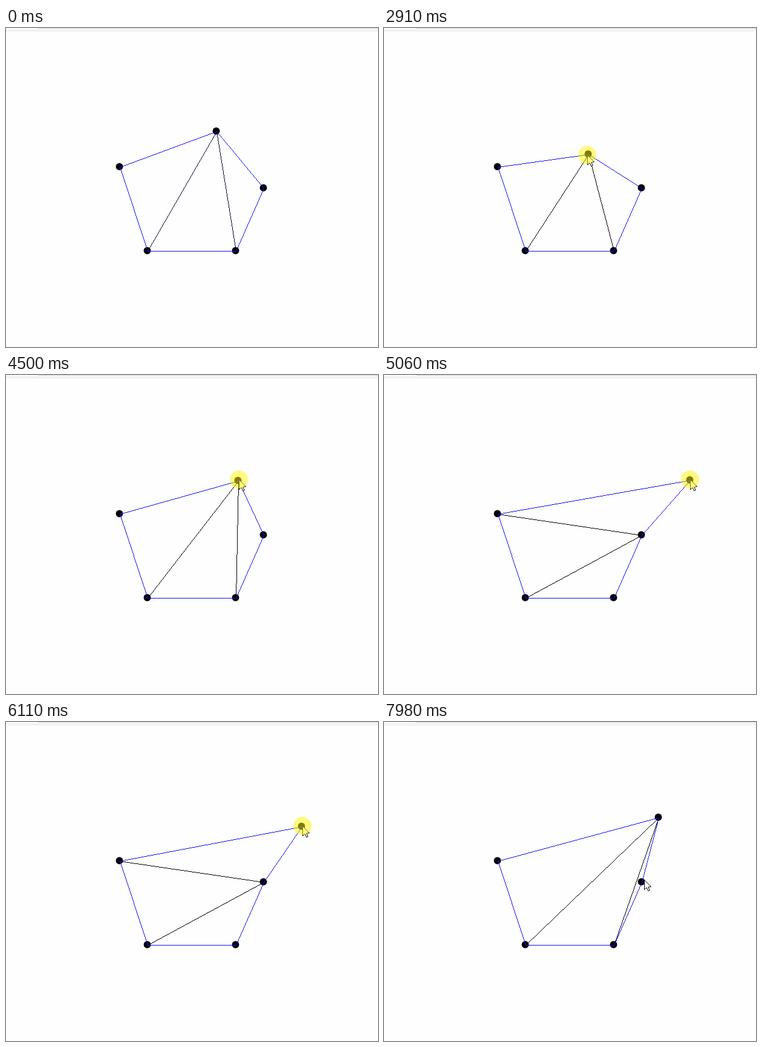
Recreate the animation shown at these times as an HTML page with a canvas. Size 615x528 px, loop 8000 ms.

```html
<!DOCTYPE html>
<html lang="en">
<head>
<meta charset="utf-8">
<title>Polygon triangulation</title>
<style>
  html, body { margin: 0; width: 100%; height: 100%; overflow: hidden; background: #fefefe; }
  canvas { display: block; }
</style>
</head>
<body>
<canvas id="stage" width="615" height="528"></canvas>
<script>
const ctx = document.getElementById('stage').getContext('2d');
const LOOP = 8000, STEP = 70, LAG = 10;
const ENTER = 330, PRESS = 2300, DRAG = 2630, RELEASE = 6870;

const A = [188, 230], C = [426, 265], D = [380, 369], E = [234, 369];
const REST = [348, 171];

// Each stroke of the pointer starts where the last one ended: start time, then [time, x, y]
const HOME = [532, 508];
const strokes = [
  [260, [960, 345, 188], [1240, 352, 168]],
  [1640, [1830, 346, 174]],
  [2560, [3120, 332, 226]],
  [3310, [3730, 226, 248], [4500, 385, 173], [5160, 508, 173],
    [5550, 339, 163], [6230, 513, 172], [6670, 453, 157]],
  [7080, [7980, 430, 262]]
];
let last = HOME;
for (const s of strokes) {
  s[0] = [s[0], ...last];
  last = s[s.length - 1].slice(1);
}

function strokeAt(t) {
  return strokes.filter(s => s[0][0] <= t).pop() || strokes[0];
}

// The picture is refreshed in fixed steps counted from the start of a stroke
function sampled(t) {
  const start = strokeAt(t)[0][0];
  return start + Math.floor((t - start) / STEP) * STEP;
}

// Smooth curve through the points, at rest at both ends of a stroke
function pointer(t) {
  const s = strokeAt(t), end = s.length - 1;
  t = Math.min(Math.max(t, s[0][0]), s[end][0]);
  let i = 0;
  while (i < end - 1 && s[i + 1][0] <= t) i++;
  const a = s[i], b = s[i + 1], h = b[0] - a[0];
  const u = (t - a[0]) / h, v = 1 - u;
  const slope = (j, k) => j === 0 || j === end ? 0 :
    (s[j + 1][k] - s[j - 1][k]) / (s[j + 1][0] - s[j - 1][0]);
  return [1, 2].map(k =>
    (1 + 2 * u) * v * v * a[k] + u * v * v * h * slope(i, k) +
    u * u * (3 - 2 * u) * b[k] - u * u * v * h * slope(i + 1, k));
}

function turn(p, q, r) {
  return (q[0] - p[0]) * (r[1] - q[1]) - (q[1] - p[1]) * (r[0] - q[0]);
}

function diagonals(B) {
  if (turn(B, C, D) < 0) return [[C, A], [C, E]];
  if (turn(A, B, C) < 0) return [[D, A], [D, B]];
  return [[B, E], [B, D]];
}

// Hard-edged one-pixel line
function line(p, q, color) {
  ctx.fillStyle = color;
  const dx = q[0] - p[0], dy = q[1] - p[1];
  const n = Math.max(Math.abs(dx), Math.abs(dy), 1);
  for (let i = 0; i <= n; i++) {
    ctx.fillRect(Math.round(p[0] + dx * i / n), Math.round(p[1] + dy * i / n), 1, 1);
  }
}

function disc(x, y, r, color) {
  ctx.fillStyle = color;
  ctx.beginPath();
  ctx.arc(x, y, r, 0, Math.PI * 2);
  ctx.fill();
}

const arrow = new Path2D('M.5 .5V16.5L4.2 13.2L6.7 18.7L9.2 17.6L6.8 12.2L11.6 11.7Z');

function drawPointer(x, y) {
  ctx.save();
  ctx.translate(x, y);
  ctx.fillStyle = '#fff';
  ctx.fill(arrow);
  ctx.strokeStyle = '#000';
  ctx.stroke(arrow);
  ctx.restore();
}

function draw(t) {
  const now = sampled(t);
  const [x, y] = pointer(now).map(Math.round);
  const B = t < DRAG ? REST :
    pointer(Math.min(now, RELEASE) - LAG).map(v => Math.round(v + 1));

  ctx.fillStyle = '#fefefe';
  ctx.fillRect(0, 0, 615, 528);
  ctx.fillStyle = '#f2f2f2';
  ctx.fillRect(0, 2, 615, 4);
  ctx.fillStyle = '#d2d2d2';
  ctx.fillRect(53, 0, 562, 1);

  const ring = [A, B, C, D, E];
  ring.forEach(([px, py]) => disc(px - 0.5, py - 0.5, 5.9, '#000'));
  diagonals(B).forEach(([p, q]) => line(p, q, t < DRAG ? '#0e0730' : '#000'));
  ring.forEach((p, i) => line(p, ring[(i + 1) % 5], '#1212ee'));

  if (t >= ENTER) drawPointer(x, y);
  if (t >= PRESS && t < RELEASE) disc(x, y, 15, 'rgba(255, 246, 0, 0.5)');
}

const begin = performance.now();
function tick() {
  draw((performance.now() - begin) % LOOP);
  requestAnimationFrame(tick);
}
tick();
</script>
</body>
</html>
```
